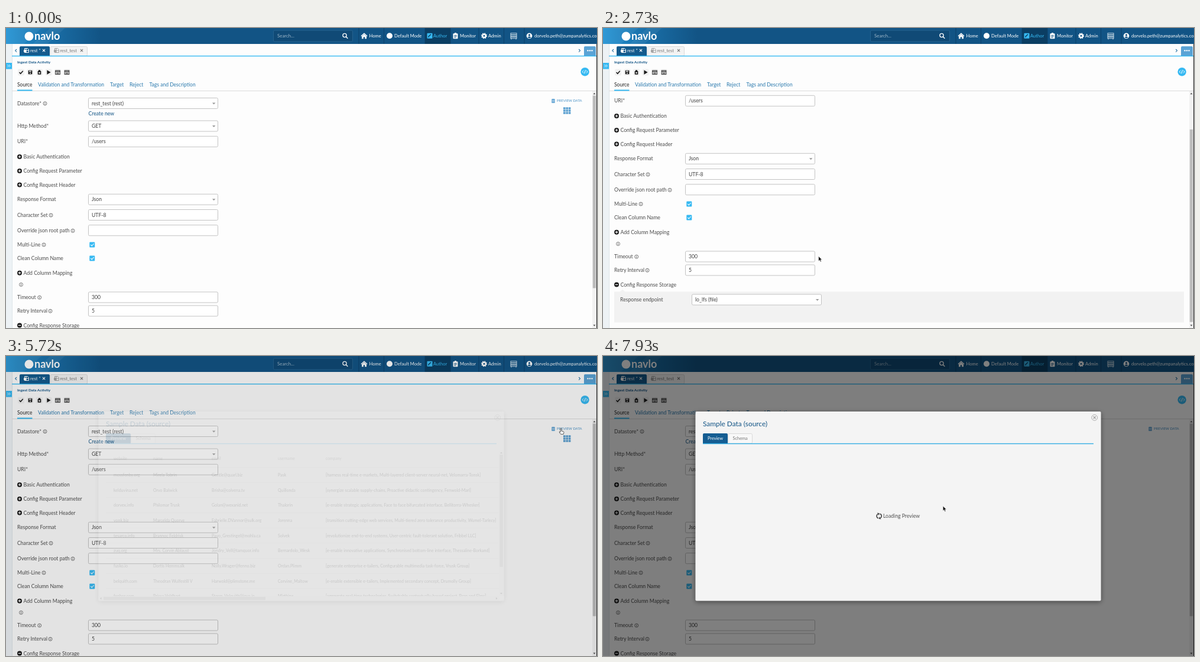
Animation, 1000 px wide and 508 px high, one loop 8 s. Source, as an HTML page:

```html
<!DOCTYPE html>
<html lang="en">
<head>
<meta charset="utf-8">
<title>Ingest Data Activity</title>
<style>
  html, body { margin: 0; width: 100%; height: 100%; overflow: hidden; background: #fdfdfd; }
  svg { display: block; width: 100%; height: 100%; font-family: Lato, sans-serif; }
  text { white-space: pre; }
</style>
</head>
<body>
<svg id="stage" viewBox="0 0 1000 508"></svg>
<script>
const NAVY = '#125485', BLUE = '#2b7aae', CYAN = '#36b9f2', INK = '#4c4c4c', BLACK = '#1c1c1c';
const STEP = 130, LOOP = 8000;

// Drawing helpers; text is placed by its left edge and vertical middle.
const text = (x, y, s, size = 8.67, fill = INK, extra = '') =>
  `<text x="${x}" y="${y + size * 0.35}" font-size="${size}" fill="${fill}" ${extra}>${s}</text>`;
const rect = (x, y, w, h, fill, extra = '') =>
  `<rect x="${x}" y="${y}" width="${w}" height="${h}" fill="${fill}" ${extra}/>`;
const circle = (x, y, r, fill, extra = '') => `<circle cx="${x}" cy="${y}" r="${r}" fill="${fill}" ${extra}/>`;
const fillPath = (d, fill) => `<path d="${d}" fill="${fill}"/>`;
const line = (d, color, w = 1) => `<path d="${d}" fill="none" stroke="${color}" stroke-width="${w}"/>`;
const group = (id, body, extra = '') => `<g id="${id}" ${extra}>${body}</g>`;
const at = (x, y, body) => `<g transform="translate(${x} ${y})">${body}</g>`;

const info = (x, y) => circle(x, y, 3, 'none', 'stroke="#555" stroke-width=".8"') +
  line(`M${x} ${y - 0.5}v2.2M${x} ${y - 1.8}v.8`, '#555', 0.9);
const toggle = (y, label, open) => circle(23, y, 4, BLACK) +
  line(`M20.7 ${y}h4.6` + (open ? '' : `M23 ${y - 2.3}v4.6`), '#fff', 1.2) + text(29.5, y, label);
const field = (x, y, value, select) =>
  rect(x + 0.5, y - 9, 219, 18, '#fff', 'rx="2" stroke="#c3c3c3"') + text(x + 6, y, value, 8.67, '#404040') +
  (select ? fillPath(`M${x + 210} ${y - 1}h5.4l-2.7 3z`, '#999') : '');
const check = y => rect(141.3, y - 4.5, 9, 9, CYAN, 'rx="1.2"') + line(`M143.3 ${y}l2 2 3.4-4`, '#fff', 1.1);
const cross = (x, y, r, color) => line(`M${x - r} ${y - r}l${2 * r} ${2 * r}m0 ${-2 * r}l${-2 * r} ${2 * r}`, color, 1.1);
const fileIcon = (x, color) => at(x, 38,
  line('M-3.5-3.5h5l2 2v5h-7zM-3.5 0h7M-1-3.5v7', color, 1) + rect(-5, -1, 4, 4, color));

function header() {
  const icons = [
    [606, fillPath('M-5.5 0L0-5l5.5 5-1 1L0-3l-4.5 4zM-4 1L0-2.6 4 1v4H1.2V2h-2.4v3H-4z', '#fff')],
    [649, circle(0, 0, 5, '#fff')],
    [717, rect(-4.5, -4.5, 9, 9, CYAN, 'rx="1"') + line('M-2.2 2.4l.4-1.6L2-2.6', '#0c3d62', 1.5)],
    [760.5, rect(-4, -4, 8, 9, '#fff', 'rx="1"') + rect(-1.5, -5.2, 3, 2, '#fff') + line('M-2.2-.8h4.4M-2.2 1h4.4M-2.2 2.8h3', NAVY, 0.9)],
    [809, circle(0, 0, 2.7, 'none', 'stroke="#fff" stroke-width="2.4"') +
      circle(0, 0, 4.2, 'none', 'stroke="#fff" stroke-width="1.6" stroke-dasharray="1.65 1.65"')],
    [859, [-4.5, -1.3, 1.9].map(y => rect(-5, y, 10, 2.5, 'none', 'stroke="#dce8f0" stroke-width=".9"')).join('') +
      line('M-4 4.5v1.6M4 4.5v1.6', '#dce8f0')],
    [885.5, circle(0, 0, 4.8, '#fff') + circle(0, -1.4, 1.7, NAVY) + fillPath('M-3.1 2.7Q0-.6 3.1 2.7Q0 5 -3.1 2.7', NAVY)]
  ];
  const labels = [[614.5, 'Home'], [657, 'Default Mode'], [723, 'Author', CYAN], [768, 'Monitor'], [816, 'Admin'],
    [894, 'dorvelo.peth@zumpanalytics.com']];
  return rect(0, 0, 1000, 27, 'url(#bar)') +
    fillPath('M0 0h60L30 27H0zM75 0h25L70 27H45z', 'rgba(255,255,255,.06)') +
    circle(39, 14, 7.5, '#fff') + text(48, 13.5, 'navlo', 18, '#fff', 'font-weight="700"') +
    rect(452.5, 4, 134, 19, '#104a76', 'rx="2" stroke="#2c6795" stroke-width=".8"') +
    text(459, 13.5, 'Search...', 7.9, '#9db7ca') +
    circle(573, 12.5, 3.1, 'none', 'stroke="#fff" stroke-width="1.3"') + line('M575.3 14.8l3 3', '#fff', 1.5) +
    rect(709, 0, 43, 27, '#0b3e63') +
    [597, 639.5, 709, 752, 800, 842.5, 877].map(x => line(`M${x} 0v27`, '#0d4068', 0.9)).join('') +
    icons.map(([x, body]) => at(x, 13.3, body)).join('') +
    labels.map(([x, s, color = '#fff']) => text(x, 13.3, s, 7.6, color)).join('');
}

function toolbar() {
  const icons = [
    line('M-3 0l2.2 2.3 4-4.6', BLACK, 1.6),
    rect(-3.3, -3.3, 6.6, 6.6, BLACK, 'rx=".8"') + rect(-2, -2.4, 3.6, 1.6, '#fff') + circle(0, 1.4, 1, '#fff'),
    rect(-2.8, -2.3, 5.6, 6, BLACK, 'rx=".7"') + rect(-1.5, -3.7, 3, 1.7, BLACK) + cross(0, 1, 1, '#fff'),
    fillPath('M-2.6-3.7L3.6 0l-6.2 3.7z', BLACK),
    ...Array(2).fill(rect(-3.8, -3, 7.6, 6.4, 'none', `stroke="${BLACK}" stroke-width=".9"`) +
      line('M-3.8-1.6h7.6M-2.2.3h1.2M-.4.3h1M1.2.3h1.2M-2.2 1.9h4.4', BLACK, 1))
  ];
  const tabs = [[54, 'Validation and Transformation'], [176, 'Target'], [209, 'Reject'], [242.5, 'Tags and Description']];
  return rect(0, 27, 10, 481, '#edf2f5') + line('M10.5 27v481', '#dde5ea') +
    rect(0, 59, 10, 10.5, CYAN) + line('M2.4 62l2 2.2-2 2.2M5.2 62l2 2.2-2 2.2', '#fff', 0.9) +
    line('M18 36l-2.3 2.3 2.3 2.3M969.2 36l2.3 2.3-2.3 2.3', '#2470a2', 1.1) +
    fillPath('M23 47V33q0-2 2-2h47q2 0 2 2v14z', '#145b8d') +
    rect(75, 31.5, 62.5, 16, '#f3f3f3', 'rx="2" stroke="#dadada"') +
    fileIcon(35, '#fff') + text(41, 38, 'rest *', 7.5, '#fff') + cross(64, 38, 2.1, '#fff') +
    fileIcon(86, '#a5a5a5') + text(91.5, 38, 'rest_test', 7.5, '#777') + cross(128, 38, 2.1, '#777') +
    fillPath('M978 47V33q0-2 2-2h16q2 0 2 2v14z', '#5aa3d5') + [984.5, 988, 991.5].map(x => circle(x, 38.3, 1.2, '#fff')).join('') +
    rect(10, 46.8, 989, 1.4, CYAN) +
    text(19, 57.5, 'Ingest Data Activity', 6.4, NAVY, 'font-weight="700"') +
    icons.map((body, i) => at(25.5 + 15.5 * i, 75, rect(-5.5, -5.5, 11, 11, '#f1f1f1', 'rx="2"') + body)).join('') +
    circle(979.6, 74.2, 7.2, CYAN) + line('M977.3 72l-2.2 2.2 2.2 2.2M981.9 72l2.2 2.2-2.2 2.2M980.5 71.2l-1.8 6', '#fff', 1) +
    text(19, 96, 'Source', 8.5, '#222') + tabs.map(([x, s]) => text(x, 96, s, 8.55, BLUE)).join('') +
    line('M10 106.5h989', '#dcdcdc') + rect(19, 104.5, 25.5, 2, CYAN);
}

function form() {
  const labels = [[127.5, 'Datastore*', 66], [166, 'Http Method*'], [192, 'URI*'], [290, 'Response Format'],
    [316.7, 'Character Set', 76], [343, 'Override json root path', 113], [366.7, 'Multi-Line', 64],
    [389.7, 'Clean Column Name'], [456, 'Timeout', 56.7], [479, 'Retry Interval', 75]];
  const fields = [[127.5, 'rest_test (rest)', 1], [166, 'GET', 1], [192.3, '/users'], [290.3, 'Json', 1],
    [316.5, 'UTF-8'], [342.7, ''], [456, '300'], [479, '5']];
  const cells = Array.from({ length: 9 }, (_, i) =>
    rect(943 + (i % 3) * 4.4, 134.3 + Math.floor(i / 3) * 4, 3.7, 3.3, '#5a9fd0')).join('');
  return labels.map(([y, s, mark]) => text(19, y, s) + (mark ? info(mark, y + 0.3) : '')).join('') +
    fields.map(([y, s, select]) => field(139, y, s, select)).join('') +
    text(139.5, 144.5, 'Create new', 8.67, NAVY) +
    toggle(218, 'Basic Authentication') + toggle(242, 'Config Request Parameter') +
    toggle(265.5, 'Config Request Header') + toggle(414.7, 'Add Column Mapping') +
    info(25.5, 434.5) + check(367) + check(390) + toggle(503.5, 'Config Response Storage', true) +
    fillPath('M19 515.5h10l4-4 4 4h946v52H19z', '#f2f2f2') +
    text(29, 529, 'Response endpoint') + field(150, 529, 'lo_lfs (file)', 1) +
    rect(923, 120, 6, 7, '#5a9fd0', 'rx="1.5"') + line('M923 122.4h6M923 124.8h6', '#fff', 0.7) +
    text(932, 123.2, 'PREVIEW DATA', 5.95, '#4a92c6') + group('grid', cells);
}

function sampleTable() {
  const columns = [182, 249, 348, 460, 541];
  const rows = [
    'mossfenby.org|Mirela Tobrin|Gentle@quarl.biz|Pask|[harness real-time e-markets, Multi-layered client-server neural-net, Velomarra-Tonsk]',
    'kelduvina.net|Orvo Balwick|Brisha@colvena.tv|Quillonda|[synergize scalable supply-chains, Proactive didactic contingency, Fenwold-Marl]',
    'dorvex.info|Philomar Trusk|Golan@wexanid.net|Thalorin|[e-enable strategic applications, Face to face bifurcated interface, Bellitorra-Whesker]',
    'vonk.biz|Marcelda Quorve|Fabrielle.DVannor@sulk.org|Jorenna|[transition cutting-edge web services, Multi-tiered zero tolerance productivity, Wumel-Tarlecy]',
    'tesarco.info|Brannoc Feldrisk|Pavo_Grestingel@mohla.ca|Solvek|[revolutionize end-to-end systems, User-centric fault-tolerant solution, Fribbel LLC]',
    'zuq.org|Mrs. Corvin Ablaust|Jondry_Vell@tamquor.info|Bernardolo_Wesk|[e-enable innovative applications, Synchronised bottom-line interface, Thessaline-Borkand]',
    'fusko.io|Dortis Hemmsalk|Nolly.Wrager@fenno.biz|Ordan.Plimm|[generate enterprise e-tailers, Configurable multimedia task-force, Vrusk Group]',
    'belquith.com|Theodran Wulfestill V|Harwold@plimstone.me|Corvine_Maltow|[e-enable extensible e-tailers, Implemented secondary concept, Drumolly Group]',
    'fenbor.com|Brissa Voldhart|Storm_Velquith@jova.io|Mirthine|[aggregate real-time technologies, Switchable contextually-based project, Brap and Elms]'
  ];
  const cells = (row, y, size, color) => row.split('|').map((s, i) => text(columns[i], y, s, size, color)).join('');
  return `<g clip-path="url(#tableClip)">` + cells('website|name|email|username|company', 174, 6.7, '#777') +
    rows.map((row, i) => line(`M169 ${188.5 + 25.67 * i}h665`, '#dedede', 0.8) +
      cells(row, 201.5 + 25.67 * i, 7, '#333')).join('') + '</g>' +
    rect(834.5, 160, 7, 246, '#ececec') + rect(835.3, 167, 5.4, 190, '#b9b9b9') +
    rect(157, 407, 678, 7, '#ececec') + rect(165, 407.7, 274, 5.4, '#b9b9b9') +
    fillPath('M836 165h4l-2-2.5zM836 401h4l-2 2.5zM161.5 408.5v4l-2.5-2zM829 408.5v4l2.5-2z', '#666');
}

function modal() {
  const spinner = line('M-3.9-.6A3.8 3.8 0 0 1 3-2.5M3.9.6A3.8 3.8 0 0 1-3 2.5', '#444', 1.5) +
    fillPath('M4.8-4.3v3.9H.9zM-4.8 4.3V.4h3.9z', '#444');
  return rect(156.5, 94, 686, 320.5, '#f4f4f4', 'rx="2" filter="url(#shadow)"') +
    text(169, 115.3, 'Sample Data (source)', 11.9, NAVY) +
    circle(831.7, 104.3, 4.9, 'none', 'stroke="#a5a5a5" stroke-width=".9"') + cross(831.7, 104.3, 2.1, '#999') +
    fillPath('M169 148v-15q0-2 2-2h38q2 0 2 2v15z', '#145d92') + text(177, 139.3, 'Preview', 7.4, '#fff') +
    rect(212, 131.5, 40.5, 16.5, '#f8f8f8', 'rx="2" stroke="#d6d6d6" stroke-width=".9"') + text(219.5, 139.3, 'Schema', 7.4, '#777') +
    rect(169, 147.8, 661, 1.4, '#35aee3') +
    group('sample', sampleTable()) +
    group('loading', at(467.2, 271, group('spinner', spinner)) + text(474, 271, 'Loading Preview', 8.63, '#505050'));
}

const arrow = `<path d="M0 0v8.2l1.9-1.7 1.3 2.9 1.5-.7-1.3-2.8h2.6z" fill="#111" stroke="#fff" stroke-width=".6"/>`;
const hand = `<path d="M-1.4-4q1.2-1 1.8.2V0l3.3.9q1 .5.8 1.6L3.7 5.4H-.8L-3.5 1.8q.3-1.2 2.1.2z" fill="#fff" stroke="#333" stroke-width=".8"/>`;

document.getElementById('stage').innerHTML = `<defs>
  <linearGradient id="bar"><stop stop-color="#2292d3"/><stop offset=".07" stop-color="#1a70a9"/>
    <stop offset=".16" stop-color="${NAVY}"/><stop offset="1" stop-color="${NAVY}"/></linearGradient>
  <clipPath id="formClip"><path d="M10 107h982v401H10z"/></clipPath>
  <clipPath id="tableClip"><path d="M157 150h677.5v256.5H157z"/></clipPath>
  <filter id="shadow"><feDropShadow dx="0" dy="2" stdDeviation="4" flood-opacity=".45"/></filter></defs>` +
  rect(0, 0, 1000, 508, '#fdfdfd') +
  `<g clip-path="url(#formClip)">${group('form', form())}</g>` + header() + toolbar() +
  rect(992, 107, 7, 401, '#f2f2f2') + rect(992.8, 114.5, 5.4, 326, '#bdbdbd', 'id="thumb"') +
  fillPath('M993.5 112.3h4l-2-2.5zM993.5 502.5h4l-2 2.5z', '#555') + rect(999, 27, 1, 481, '#2b2b2b') +
  group('backdrop', rect(0, 0, 1000, 508, '#000')) + group('modal', modal()) +
  group('cursor', group('arrow', arrow) + group('hand', hand));

// Keys are [time, value, ...]; values between keys are interpolated linearly.
function track(keys, t) {
  const next = keys.findIndex(key => key[0] > t);
  if (next === 0) return keys[0].slice(1);
  if (next < 0) return keys[keys.length - 1].slice(1);
  const a = keys[next - 1], b = keys[next], p = (t - a[0]) / (b[0] - a[0]);
  return a.slice(1).map((v, i) => v + (b[i + 1] - v) * p);
}

const scrollKeys = [[2080, 0], [2210, 12], [2340, 30], [2470, 48], [2600, 63], [2730, 69],
  [3640, 69], [3770, 38.6], [3900, 16], [4030, 4], [4160, 0]];
const cursorKeys = [[130, 430, 490], [390, 400, 440], [1560, 400, 440], [2080, 364.7, 386.5], [4420, 364.7, 386.5],
  [4550, 377.3, 374.5], [4810, 470, 320], [4940, 470, 320], [5200, 720, 190], [5330, 880, 138], [5460, 939.5, 127],
  [5980, 939.5, 127], [6110, 850, 165], [6240, 680, 225], [6370, 575.2, 254]];
const backdropKeys = [[5590, 0], [5720, 0.1], [5850, 0.3], [5980, 0.5]];
const modalKeys = [[5590, 0], [5720, 0.15], [5850, 0.52], [5980, 0.9], [6110, 1]];

const part = Object.fromEntries([...document.querySelectorAll('g[id], #thumb')].map(node => [node.id, node]));
const show = (name, visible) => part[name].setAttribute('display', visible ? 'inline' : 'none');
const move = (name, x, y) => part[name].setAttribute('transform', `translate(${x} ${y})`);
const fade = (name, keys, t) => part[name].setAttribute('opacity', track(keys, t)[0]);

function render(now) {
  const t = Math.floor((now % LOOP) / STEP) * STEP;
  const [scroll] = track(scrollKeys, t);
  move('form', 0, -scroll);
  move('thumb', 0, scroll * 0.83);
  move('cursor', ...track(cursorKeys, t));
  show('cursor', t >= 130);
  const pointing = t >= 5460 && t <= 5980;
  show('hand', pointing);
  show('arrow', !pointing);
  const loading = t >= 5980;
  show('grid', !loading);
  show('sample', !loading);
  show('loading', loading);
  fade('backdrop', backdropKeys, t);
  fade('modal', modalKeys, t);
  part.spinner.setAttribute('transform', `rotate(${(t - 6370) * 0.18})`);
}

const start = performance.now();
function frame() {
  render(performance.now() - start);
  requestAnimationFrame(frame);
}
frame();
</script>
</body>
</html>
```
